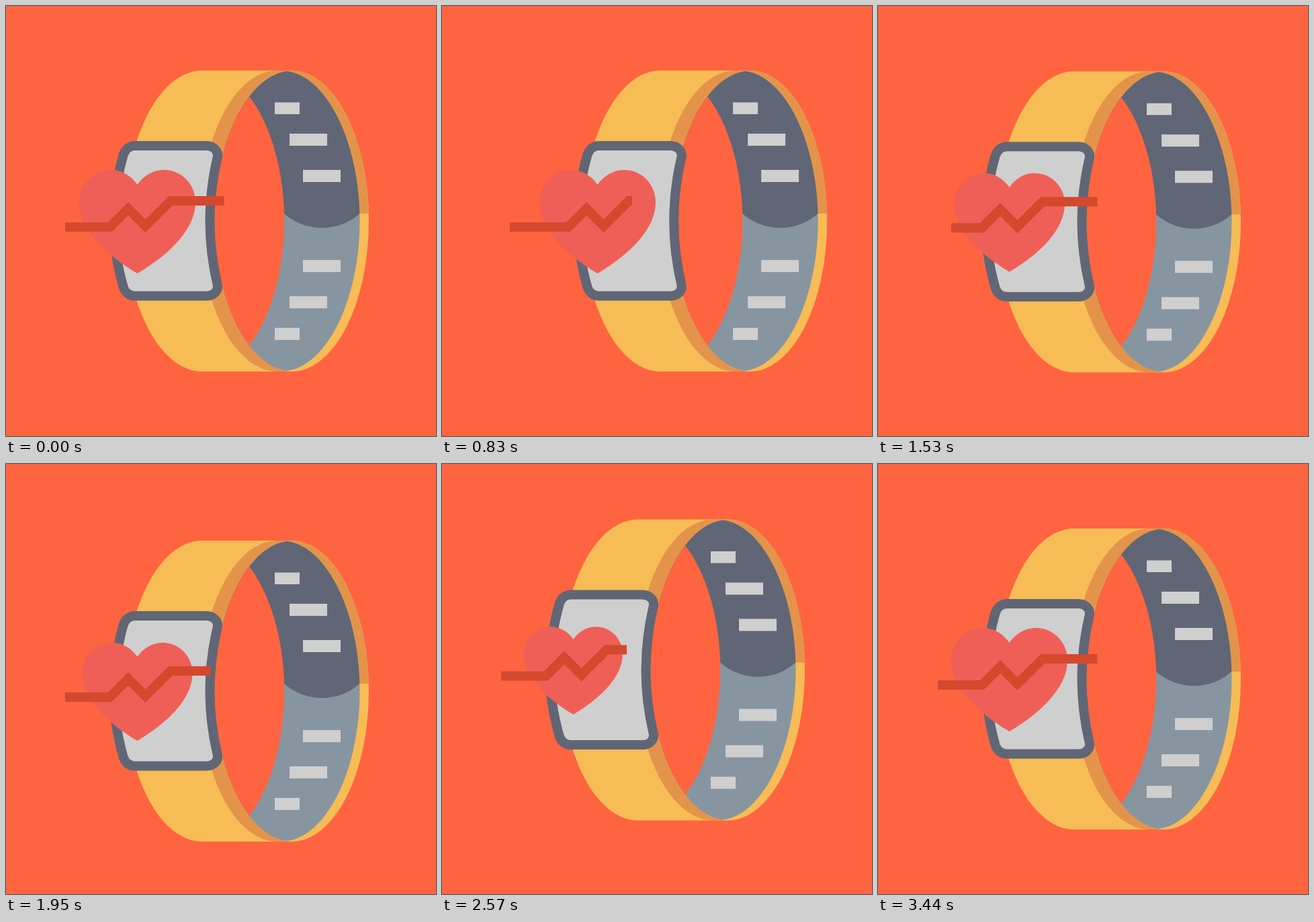
Recreate the animation shown at these times as an HTML page. Size 640 by 640 pixels, loop 3480 ms.

```html
<!DOCTYPE html>
<html lang="en">
<head>
<meta charset="utf-8">
<title>Fitness band</title>
<style>
  html, body { margin: 0; width: 100%; height: 100%; overflow: hidden; background: #ff6440; }
  svg { display: block; width: 100vw; height: 100vh; }
</style>
</head>
<body>
<svg viewBox="0 0 640 640">
  <defs>
    <path id="ring" d="M418.5 97C478 105 526.5 204 526.5 320S478 535 418.5 543C358 535 310.5 436 310.5 320S358 105 418.5 97Z"/>
    <clipPath id="inside"><use href="#ring"/></clipPath>
  </defs>
  <g id="all">
    <g id="band">
      <path fill="#f7bc55" d="M292 96H425A115 224 0 0 1 425 544H292A115 224 0 0 1 292 96Z"/>
      <path fill="#e4944a" d="M404 96H425A115 224 0 0 1 540 309H418V544H404A115 224 0 0 1 404 96Z"/>
      <g clip-path="url(#inside)">
        <path fill="#8795a1" d="M300 90H530V550H300Z"/>
        <path fill="#606675" d="M300 90H530V309H526.5A85 85 0 0 1 414 309H300Z"/>
        <path fill="#ff6440" d="M306 97C365.5 105 414.2 204 414.2 320S365.5 535 306 543Z"/>
      </g>
      <path fill="#cfcfcf" d="M400 143.5h37v17.5h-37zM422 190h56v18h-56zM442 244h56v18h-56zM442 378h56v18h-56zM422 432h56v18h-56zM400 479h37v18h-37z"/>
    </g>
    <path id="device" fill="#cfcfcf" stroke="#606675" stroke-width="14"
      d="M192 208H298C309 208 317 216 314.5 226C299.5 290 299.5 350 314.5 414C317 424 309 431.5 298 431.5H192C183 431.5 177 426 174.5 418C155.5 350 155.5 290 174.5 222C177 214 183 208 192 208Z"/>
    <path id="heart" fill="#ef5f57"
      d="M195.5 266C186 252 171 244 156 244C130 244 109 265 109 292C109 332 148 370 195.5 398C243 370 282 332 282 292C282 265 261 244 235 244C220 244 205 252 195.5 266Z"/>
    <path id="pulse" fill="none" stroke="#d4482e" stroke-width="14" stroke-dasharray="275 51"/>
  </g>
</svg>
<script>
const LOOP = 3480;
const [all, band, device, heart, pulse] =
  ['all', 'band', 'device', 'heart', 'pulse'].map(id => document.getElementById(id));

const linear = x => x;
const sine = x => (1 - Math.cos(Math.PI * x)) / 2;

// keys: [time, value] pairs in order of time
function track(keys, t, ease) {
  if (t <= keys[0][0]) return keys[0][1];
  for (let i = 1; i < keys.length; i++) {
    const [t0, a] = keys[i - 1], [t1, b] = keys[i];
    if (t < t1) return a + (b - a) * ease((t - t0) / (t1 - t0));
  }
  return keys[keys.length - 1][1];
}

const sway = (left, right) => [[0, 0], [477, left], [900, right], [1450, 0]];
const bandX = sway(-38, 38);
const deviceX = sway(-50.3, 48);
const heartX = sway(-44.5, 41.5);
const bobY = [[1424, 0], [2089, 20], [2745, -20], [3419, 0]];
const dash = [[0, 0.5], [500, 283], [830, 381.4], [1530, 631], [1950, 672.5],
              [2570, 1028.5], [3440, 1303], [LOOP, 1304.5]];

const BEAT = { start: 1464, period: 416, count: 4, depth: 0.2 };

function heartScale(t) {
  const n = (t - BEAT.start) / BEAT.period;
  return n < 0 || n > BEAT.count ? 1 : 1 - BEAT.depth * sine(2 * n);
}

const moveX = (el, x) => el.setAttribute('transform', `translate(${x} 0)`);

function draw(t) {
  const x = track(bandX, t, sine);
  all.setAttribute('transform', `translate(0 ${track(bobY, t, sine)})`);
  moveX(band, x);
  moveX(device, track(deviceX, t, sine));
  heart.setAttribute('transform',
    `translate(${195.5 + track(heartX, t, sine)} 321) scale(${heartScale(t)}) translate(-195.5 -321)`);

  // the zigzag follows the band while the line's ends lag behind
  pulse.setAttribute('d', `M${88 + 0.39 * x} 329H${154.7 + x}l27.3 -27.3 25.5 25.5L${245 + x} 290H${326.5 + 0.13 * x}`);
  pulse.setAttribute('stroke-dashoffset', track(dash, t, linear));
}

const begin = performance.now();
function tick() {
  draw((performance.now() - begin) % LOOP);
  requestAnimationFrame(tick);
}
tick();
</script>
</body>
</html>
```
